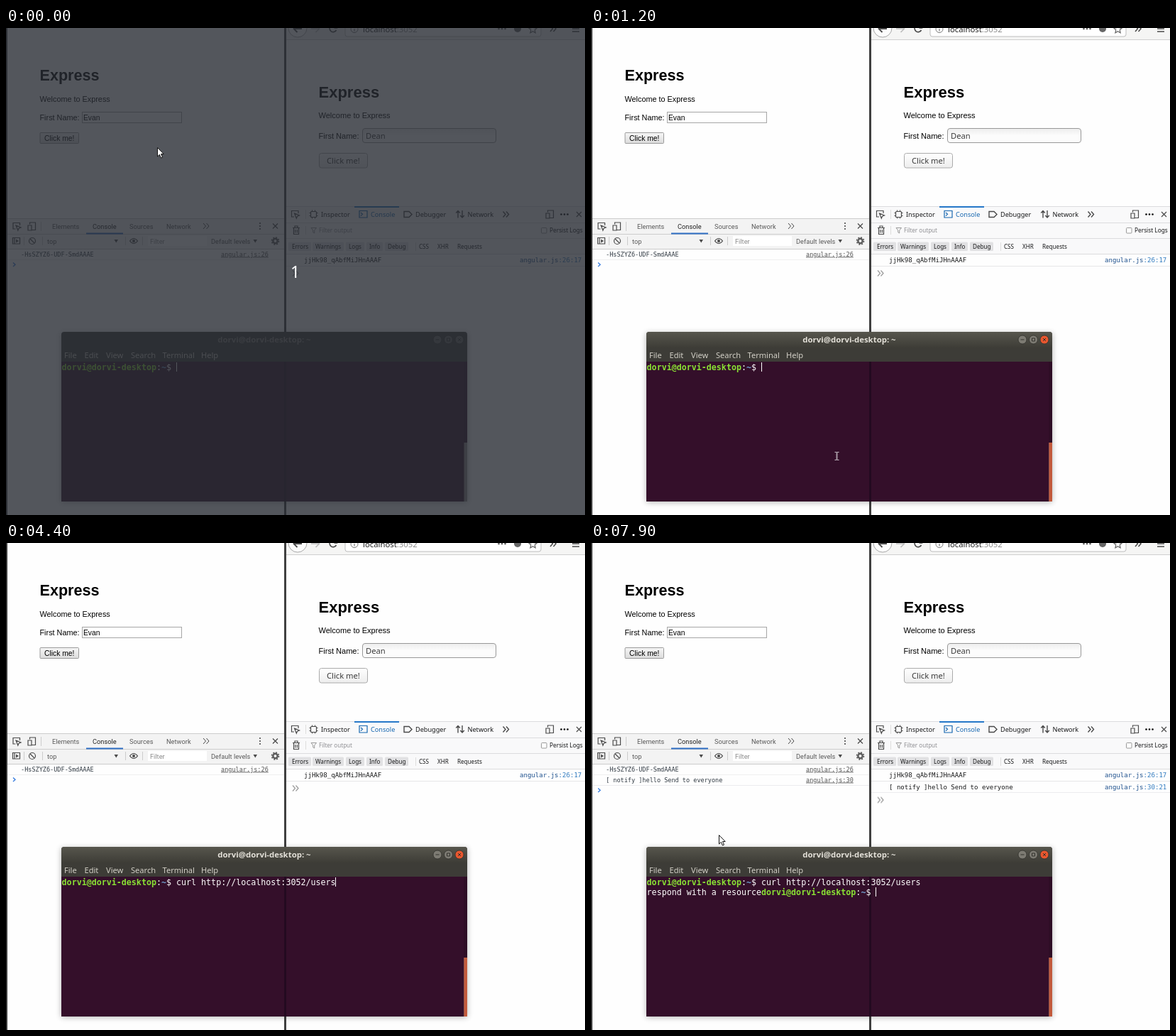
Animation of 816x686 px, one loop 8 s. Source, as an HTML page:

```html
<!DOCTYPE html>
<html lang="en">
<head>
<meta charset="utf-8">
<title>Socket demo</title>
<style>
html, body { margin: 0; width: 100%; height: 100%; overflow: hidden; background: #fefefe; }
svg { display: block; width: 816px; height: 686px; }
text { white-space: pre; }
.arial { font-family: "Liberation Sans", Arial, sans-serif; }
.ui { font-family: "Noto Sans", "Open Sans", sans-serif; }
.rob { font-family: Roboto, sans-serif; font-size: 9.26px; fill: #5a5a5a; }
.mono { font-family: "DejaVu Sans Mono", monospace; }
.log { font-size: 8.54px; fill: #303942; }
.flog { font-size: 9.07px; fill: #18191a; }
.tab { font-size: 9.15px; fill: #18191a; }
.sm { font-size: 8.1px; fill: #18191a; }
.link { fill: #545454; text-decoration: underline; }
.flink { fill: #2f7abf; }
.term { font-size: 11.66px; fill: #fff; }
.user { fill: #8ae234; font-weight: bold; }
.path { fill: #729fcf; font-weight: bold; }
.title { font-size: 11.4px; font-weight: 600; text-anchor: middle; }
.line { fill: none; stroke: #4a4a4a; stroke-width: 1.2; }

#veil, #focus, #caret, #arrow, #beam, #clear, #curl, #reply, #msgs, #in1, #in2 {
  animation: 8s step-end infinite;
}
#veil { animation-name: veil; }
#focus { animation-name: focus; }
#caret { animation-name: caret; }
#arrow { animation-name: arrow; }
#beam { animation-name: beam; }
#clear { animation-name: clear; }
#curl { animation-name: curl; }
#reply { animation-name: reply; }
#msgs { animation-name: msgs; }
#in1 { animation-name: in1; }
#in2 { animation-name: in2; }

@keyframes veil { 0% { opacity: 1 } 6.25%, 100% { opacity: 0 } }
@keyframes focus { 0% { opacity: 0 } 12.5% { opacity: .4 } 13.75% { opacity: .75 } 15%, 100% { opacity: 1 } }
@keyframes clear { 0% { opacity: 0 } 37.5% { opacity: 1 } 43.75%, 100% { opacity: 0 } }
@keyframes curl { 0% { opacity: 0 } 43.75%, 100% { opacity: 1 } }
@keyframes reply { 0% { opacity: 0 } 68.75%, 100% { opacity: 1 } }
@keyframes msgs { 0% { opacity: 0 } 77.5%, 100% { opacity: 1 } }
@keyframes in1 { 0% { transform: none } 77.5%, 100% { transform: translateY(15px) } }
@keyframes in2 { 0% { transform: none } 77.5%, 100% { transform: translateY(16.5px) } }
@keyframes caret {
  0% { opacity: 1; transform: translate(240px, 471px) }
  22.5% { opacity: 0 }
  30% { opacity: 1 }
  37.5% { transform: translate(275px, 471px) }
  43.75% { transform: translate(464px, 471px) }
  47.5% { opacity: 0 }
  55% { opacity: 1 }
  62.5% { opacity: 0 }
  63.75% { opacity: 1 }
  68.75% { transform: translate(401px, 485px) }
  71.25% { opacity: 0 }
  78.75% { opacity: 1 }
  86.25% { opacity: 0 }
  93.75%, 100% { opacity: 1; transform: translate(401px, 485px) }
}
@keyframes arrow {
  0% { opacity: 1; transform: translate(213px, 168px) }
  8.75% { opacity: 0 }
  97.5% { opacity: 1; transform: translate(192px, 433px) }
  98.75%, 100% { opacity: 1; transform: translate(180px, 411px) }
}
@keyframes beam {
  0% { opacity: 0; transform: translate(83px, 560px) }
  8.75% { opacity: 1 }
  10% { transform: translate(339px, 626px) }
  12.5% { transform: translate(346.5px, 603px) }
  22.5% { transform: translate(349px, 598px) }
  25% { transform: translate(341px, 602px) }
  33.75% { opacity: 0 }
  92.5% { opacity: 1; transform: translate(341px, 612px) }
  93.75% { transform: translate(334px, 629px) }
  95% { transform: translate(290px, 575px) }
  96.25% { transform: translate(240px, 505px) }
  97.5%, 100% { opacity: 0; transform: translate(240px, 505px) }
}
</style>
</head>
<body>
<svg viewBox="0 0 816 686" xmlns="http://www.w3.org/2000/svg">
<defs>
  <linearGradient id="btn" x2="0" y2="1"><stop stop-color="#f6f6f6"/><stop offset="1" stop-color="#dcdcdc"/></linearGradient>
  <linearGradient id="soft" x2="0" y2="1"><stop stop-color="#fff"/><stop offset="1" stop-color="#ededed"/></linearGradient>
  <linearGradient id="field" x2="0" y2="1"><stop stop-color="#ededed"/><stop offset=".5" stop-color="#fcfcfc"/></linearGradient>
  <linearGradient id="bar" x2="0" y2="1"><stop stop-color="#57564d"/><stop offset="1" stop-color="#3e3d37"/></linearGradient>
  <filter id="blur" x="-5%" y="-10%" width="110%" height="120%"><feGaussianBlur stdDeviation="4.5"/></filter>
  <path id="more" d="M0 0l3.5 4-3.5 4M4.5 0l3.5 4-3.5 4"/>
  <path id="pick" d="M10 4V.5H.5V9H4M4.5 4l7 3-3 1.200-1.200 3z"/>
  <path id="dock" d="M3 3V.5h8V11H6M.5 4.500h5V11.500h-5z"/>
</defs>

<rect width="816" height="686" fill="#fefefe"/>

<!-- left page -->
<g class="arial">
  <text x="47.500" y="74" font-size="21.6" font-weight="bold">Express</text>
  <g font-size="10.85">
    <text x="47.500" y="104">Welcome to Express</text>
    <text x="47.500" y="129.500">First Name:</text>
  </g>
  <rect x="107.500" y="118.500" width="140" height="15" fill="#fff" stroke="#a6a6a6"/>
  <rect x="48" y="147.500" width="54.500" height="15" rx="1" fill="url(#btn)" stroke="#9a9a9a"/>
  <g font-size="10.3">
    <text x="109" y="129.500">Evan</text>
    <text x="54" y="158.500">Click me!</text>
  </g>
</g>

<!-- left devtools -->
<rect x="2" y="268" width="390" height="43" fill="#f3f3f3"/>
<path d="M2 268.500H392M2 290.500H392M2 311.500H392" stroke="#ccc"/>
<path d="M2 326.500H392" stroke="#f0f0f0"/>
<rect x="113" y="288.500" width="52" height="2" fill="#2f6fc4"/>
<g class="line">
  <use href="#pick" x="9.500" y="274"/>
  <use href="#dock" x="30.500" y="273.500"/>
  <path d="M49.500 273v13M25.500 294v12M51.500 294v12M168.500 294v12M192.500 294v12" stroke="#ccc" stroke-width="1"/>
  <use href="#more" x="278" y="275" stroke-width="1"/>
  <path d="M376 275.500l7 7m0-7l-7 7"/>
  <path d="M9.500 295.500h10v8.500h-10zM12 295.500v8.500"/>
  <circle cx="37" cy="300" r="4.500"/><path d="M34 297l6 6"/>
  <path d="M174.500 300q5.500-7 11 0q-5.500 7-11 0z"/>
</g>
<g fill="#4a4a4a">
  <path d="M14 297.500l4 2.500-4 2.500z"/>
  <circle cx="180" cy="300" r="2"/>
  <circle cx="358" cy="275" r="1.100"/><circle cx="358" cy="279" r="1.100"/><circle cx="358" cy="283" r="1.100"/>
  <path d="M152.500 298h5.500l-2.750 4.500zM348.500 298h5.500l-2.750 4.500z"/>
</g>
<circle cx="379.500" cy="300" r="3.200" fill="none" stroke="#5a5a5a" stroke-width="2.400"/>
<circle cx="379.500" cy="300" r="5" fill="none" stroke="#5a5a5a" stroke-width="1.600" stroke-dasharray="2 1.930"/>
<rect x="200" y="293" width="83" height="14" fill="#fff"/>
<g class="rob">
  <text x="65" y="282.500">Elements</text>
  <text x="122" y="282.500" fill="#222">Console</text>
  <text x="174" y="282.500">Sources</text>
  <text x="226" y="282.500">Network</text>
  <text x="58" y="303.500">top</text>
  <text x="203" y="304" style="fill:#8a8a8a">Filter</text>
  <text x="289" y="303.500">Default levels</text>
</g>
<g class="mono log">
  <text x="21" y="321.500">-HsSZYZ6-UDF-SmdAAAE</text>
  <text x="303" y="321.500" class="link">angular.js:26</text>
</g>
<path id="in1" d="M10 330.500l3 2.800-3 2.800" fill="none" stroke="#3a7ede" stroke-width="1.400"/>

<!-- right browser -->
<rect x="395" width="421" height="16" fill="#f5f5f4"/>
<path d="M395 16.500H816" stroke="#cfcfcf"/>
<rect x="478" y="-12" width="276" height="24" rx="3" fill="#fff" stroke="#bdbdbd"/>
<circle cx="411" cy="0" r="13" fill="#fdfdfd" stroke="#a8a8a8"/>
<g class="line">
  <path d="M417 1h-11.500m5-5l-5 5 5 5" stroke-width="1.800"/>
  <path d="M430 1h11.500m-5-5l5 5-5 5" stroke="#bbb" stroke-width="1.600"/>
  <path d="M465.500 3a5 5 0 1 1-1-6M466.500-4v4h-4" stroke-width="1.600"/>
  <circle cx="491" cy="1.500" r="5" stroke="#777" stroke-width="1"/>
  <path d="M491 1v3.500M491-2v1.500" stroke="#777"/>
  <path d="M742.500-4l1.700 3.700 4 .4-3 2.700.9 4-3.600-2.100-3.600 2.100.9-4-3-2.700 4-.4z" stroke="#666"/>
  <use href="#more" x="767" y="-3" stroke-width="1.500"/>
  <path d="M798-3h10M798 1h10M798 5h10" stroke-width="1.600"/>
</g>
<g fill="#666">
  <circle cx="694.500" cy="1" r="1.400"/><circle cx="699" cy="1" r="1.400"/><circle cx="703.500" cy="1" r="1.400"/>
  <circle cx="721" cy="1" r="5"/>
</g>
<text class="ui" x="503" y="6" font-size="11.3" fill="#222">localhost<tspan fill="#8c8c8c">:3052</tspan></text>

<g class="arial">
  <text x="440.500" y="97.500" font-size="22" font-weight="bold">Express</text>
  <g font-size="11.05">
    <text x="440.500" y="127">Welcome to Express</text>
    <text x="440.500" y="156">First Name:</text>
  </g>
</g>
<rect x="502.500" y="141.500" width="188" height="20" rx="3.500" fill="url(#field)" stroke="#989898"/>
<rect x="441.500" y="176.500" width="68" height="20.500" rx="3" fill="url(#soft)" stroke="#aaa"/>
<g class="ui" font-size="11.2" fill="#3c3c3c">
  <text x="507" y="156">Dean</text>
  <text x="452" y="191">Click me!</text>
</g>

<!-- right devtools -->
<rect x="395" y="251" width="421" height="67" fill="#f9f9fa"/>
<path d="M395 251.500H816M395 274.500H816M395 296.500H816M395 318.500H816" stroke="#dcdcde"/>
<path d="M395 335.500H816" stroke="#e6e6e8"/>
<rect x="491" y="251" width="63" height="2" fill="#2577c8"/>
<g class="line" stroke="#222">
  <use href="#pick" x="402" y="257"/>
  <path d="M422.500 256v13" stroke="#ddd" stroke-width="1"/>
  <rect x="429.500" y="258.500" width="8" height="8" rx="1"/>
  <path d="M431.500 258.500v-2m4 2v-2M431.500 268.500v-2m4 2v-2M427.500 260.500h2m-2 4h2M437.500 260.500h2m-2 4h2" stroke-width="1"/>
  <path d="M498 257.500h11v9.500h-11zM500 260l2.500 2.300-2.500 2.300" stroke="#1566b0"/>
  <path d="M561 258.500h7l4 4-4 4h-7z" stroke-width="1.400"/>
  <path d="M637 267.500v-10m-2.800 3l2.800-3 2.800 3M643 257v10m-2.800-3l2.800 3 2.800-3" stroke-width="1.400"/>
  <use href="#more" x="700.500" y="258.500" stroke-width="1.400"/>
  <use href="#dock" x="760.500" y="256.500"/>
  <path d="M804 259l7 7m0-7l-7 7"/>
  <path d="M404 281.500h10M407 281v-2h4v2M405.500 282v8.500h7V282M407.700 284v4.500m2.600-4.500v4.500"/>
  <path d="M422.500 279v12" stroke="#ddd" stroke-width="1"/>
  <path d="M430 281.500h7.500l-2.800 3.500v4l-2-1.200v-2.800z" stroke="#999" stroke-width="1"/>
  <rect x="754.500" y="281.500" width="7.500" height="7.500" rx="1" stroke="#999" stroke-width="1" fill="#fff"/>
  <path d="M577.500 302v12" stroke="#ddd" stroke-width="1"/>
</g>
<circle cx="782.500" cy="262.500" r="1.300"/><circle cx="787" cy="262.500" r="1.300"/><circle cx="791.500" cy="262.500" r="1.300"/>
<g class="ui tab">
  <text x="444" y="265.500">Inspector</text>
  <text x="514" y="265.500" style="fill:#1566b0">Console</text>
  <text x="577" y="265.500">Debugger</text>
  <text x="650.500" y="265.500">Network</text>
</g>
<g fill="#e1e1e3">
  <rect x="398" y="301.500" width="32" height="12.500" rx="1.500"/>
  <rect x="432" y="301.500" width="44" height="12.500" rx="1.500"/>
  <rect x="479" y="301.500" width="26" height="12.500" rx="1.500"/>
  <rect x="508" y="301.500" width="23" height="12.500" rx="1.500"/>
  <rect x="534" y="301.500" width="33" height="12.500" rx="1.500"/>
</g>
<g class="ui sm">
  <text x="441" y="288" style="fill:#8f8f93">Filter output</text>
  <text x="766" y="288" font-size="8.3">Persist Logs</text>
  <text x="403" y="310.500">Errors</text>
  <text x="436" y="310.500">Warnings</text>
  <text x="483" y="310.500">Logs</text>
  <text x="512" y="310.500">Info</text>
  <text x="538" y="310.500">Debug</text>
  <text x="582" y="310.500">CSS</text>
  <text x="608" y="310.500">XHR</text>
  <text x="636" y="310.500">Requests</text>
</g>
<g class="mono flog">
  <text x="420" y="330">jjHk98_qAbfMiJHnAAAF</text>
  <text x="724" y="330" fill="#1c4f8c">angular.js<tspan class="flink">:26:17</tspan></text>
</g>
<g id="in2"><use href="#more" x="404" y="341.500" fill="none" stroke="#999" stroke-width="1.200"/></g>

<!-- broadcast messages -->
<g id="msgs" class="mono">
  <path d="M2 341.500H392M395 351.500H816" stroke="#ececee"/>
  <g class="log">
    <text x="21" y="336.500">[ notify ]hello Send to everyone</text>
    <text x="303" y="336.500" class="link">angular.js:30</text>
  </g>
  <g class="flog">
    <text x="420" y="346.500">[ notify ]hello Send to everyone</text>
    <text x="724" y="346.500" fill="#1c4f8c">angular.js<tspan class="flink">:30:21</tspan></text>
  </g>
</g>

<rect width="2" height="686" fill="#3d3d3d"/>
<rect x="392" width="3" height="686" fill="#404040"/>

<!-- terminal -->
<rect x="78" y="430" width="572" height="238" fill="#000" opacity=".3" filter="url(#blur)"/>
<path d="M78 470V432q0-4 4-4H646q4 0 4 4V470z" fill="#3d3c37"/>
<rect x="78" y="470" width="572" height="197" fill="#340f2a"/>
<rect x="392" y="470" width="3" height="197" fill="#230a20"/>
<rect x="645.500" y="470" width="4.500" height="114" fill="#2d0d25"/>
<rect x="645.500" y="584" width="4.500" height="83" fill="#928e8d"/>
<g fill="#6b6a64" stroke="#2f2e2a" stroke-width=".8">
  <circle cx="608" cy="439" r="6"/><circle cx="623.500" cy="439" r="6"/><circle cx="639" cy="439" r="6"/>
</g>
<text class="ui title" x="364" y="443" fill="#86847d">dorvi@dorvi-desktop: ~</text>
<g id="focus">
  <rect x="78" y="430" width="572" height="239" fill="#000" opacity=".35" filter="url(#blur)" clip-path="path('M60 410H670V690H60ZM78 428V667H650V428Z')"/>
  <path d="M78 450V432q0-4 4-4H646q4 0 4 4V450z" fill="url(#bar)"/>
  <rect x="645.500" y="584" width="4.500" height="83" fill="#c25a3c"/>
  <g fill="#7d7b73" stroke="#32312c" stroke-width=".8">
    <circle cx="608" cy="439" r="6"/><circle cx="623.500" cy="439" r="6"/>
    <circle cx="639" cy="439" r="6" fill="#e9572f"/>
  </g>
  <text class="ui title" x="364" y="443" fill="#e4e1d9">dorvi@dorvi-desktop: ~</text>
</g>
<path d="M605.500 439h5M621.500 437h4v4h-4zM637 437l4 4m0-4l-4 4" fill="none" stroke="#33322d"/>
<g class="ui" font-size="11.1" fill="#d2cfc6">
  <text x="82" y="465">File</text>
  <text x="110.500" y="465">Edit</text>
  <text x="141" y="465">View</text>
  <text x="176" y="465">Search</text>
  <text x="220.500" y="465">Terminal</text>
  <text x="275" y="465">Help</text>
</g>
<g class="mono term">
  <text x="78.600" y="482"><tspan class="user">dorvi@dorvi-desktop</tspan>:<tspan class="path">~</tspan>$ </text>
  <text id="clear" x="240" y="482">clear</text>
  <text id="curl" x="240" y="482">curl http://localhost:3052/users</text>
  <text id="reply" x="78.600" y="496">respond with a resource<tspan class="user">dorvi@dorvi-desktop</tspan>:<tspan class="path">~</tspan>$ </text>
</g>
<rect id="caret" width="1" height="13" fill="#fff"/>

<!-- countdown -->
<g id="veil">
  <rect width="816" height="686" fill="#282c34" opacity=".8"/>
  <text class="ui" x="407.500" y="351.500" font-size="23" font-weight="500" text-anchor="middle" fill="#fff">1</text>
</g>

<!-- pointers -->
<path id="beam" d="M-3-5.500h2.200q.8 0 .8 1V4.500q0 1-.8 1H-3M3-5.500H.8q-.8 0-.8 1V4.500q0 1 .8 1H3" fill="none" stroke="#d8d4d8" stroke-width=".9"/>
<path id="arrow" d="M.5.500V13l2.900-2.700 2 4.700 2.100-.9-2-4.600h3.700z" fill="#fff" stroke="#111" stroke-width="1"/>
</svg>
</body>
</html>
```
